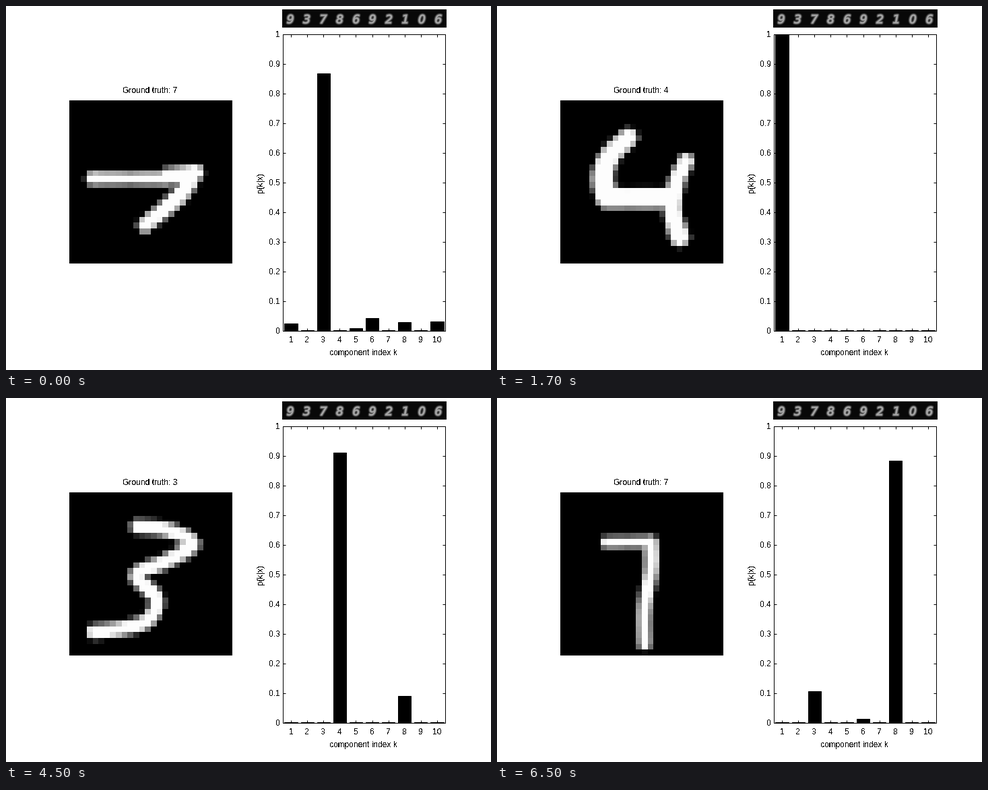
Write a matplotlib script that moves like this. It is 720 by 540 pixels and loops after 8 s.

```python
import numpy as np
import matplotlib.pyplot as plt
from matplotlib.animation import FuncAnimation
from matplotlib.patches import Rectangle
from matplotlib.patheffects import Normal, Stroke

W, H = 720, 540
LEFT, RIGHT, TOP, BOTTOM = 411, 652, 42, 482
STEP = (RIGHT - LEFT) / 10
GRID = 28

plt.rcParams["font.family"] = "Liberation Sans"


def spline(*keys, samples=16):
    """Catmull-Rom curve through the key points."""
    p = np.array([keys[0], *keys, keys[-1]], float)
    t = np.linspace(0, 1, samples)[:, None]
    parts = [
        b + t * (c - a) / 2 + t**2 * (a - 2.5 * b + 2 * c - d / 2)
        + t**3 * (1.5 * (b - c) + (d - a) / 2)
        for a, b, c, d in zip(p, p[1:], p[2:], p[3:])
    ]
    return np.concatenate(parts)


def ellipse(cx, cy, rx, ry):
    angle = np.linspace(0, 2 * np.pi, 120)
    return np.column_stack([cx + rx * np.cos(angle), cy + ry * np.sin(angle)])


def pen(path, start, end=None):
    """Grey image of a soft pen whose radius runs from start to end."""
    radius = np.linspace(start, start if end is None else end, len(path))
    cells = np.arange(GRID) + 0.5
    dx = cells[None, :, None] - path[:, 0]
    dy = cells[:, None, None] - path[:, 1]
    depth = (radius - np.hypot(dx, dy)).max(axis=2)
    return np.clip(depth + 0.5, 0, 1) * 0.99


def digit(*strokes):
    return np.max(strokes, axis=0)


wide_seven = digit(
    pen(spline((4, 13.4), (17, 13.4)), 1.15),
    pen(spline((17, 13), (21.7, 12.4)), 1.4),
    pen(spline((21, 13), (18.8, 16.5), (13, 21.4)), 1.6, 1.3),
)
four = digit(
    pen(spline((11.7, 6.4), (8.6, 9.5), (7.3, 13), (8, 16.4)), 1.6, 2),
    pen(spline((8, 16.75), (18.5, 16.75)), 1.8),
    pen(spline((21.6, 10.4), (20, 14), (19.3, 19), (20.5, 23.4)), 1.3, 1.7),
)
zero = digit(
    pen(ellipse(14.9, 14.8, 8.9, 6.7), 1.05),
    pen(spline((13.4, 6.4), (12.7, 8)), 1.2, 1.8),
    pen(spline((13, 8.8), (12.5, 10.9)), 0.65),
)
three = digit(
    pen(spline((11.8, 5.9), (17, 6.5), (21.2, 8.9), (16.5, 11.9),
               (11.6, 14.2), (15, 18.3), (13.4, 22), (9, 23.4),
               (4.2, 23.95)), 1.25),
)
slim_seven = digit(
    pen(spline((8, 8.6), (15, 8.5)), 0.95),
    pen(spline((15.5, 8.7), (15.6, 13), (14.5, 20), (14.5, 26)), 1.25, 1.05),
)

# (number of half seconds, label, image, probabilities that are not near zero)
scenes = [
    (1, 7, wide_seven, {1: 0.025, 3: 0.869, 5: 0.01, 6: 0.043, 8: 0.03,
                        10: 0.032}),
    (4, 4, four, {1: 1}),
    (4, 10, zero, {9: 1}),
    (4, 3, three, {4: 0.911, 8: 0.091}),
    (3, 7, slim_seven, {3: 0.107, 6: 0.014, 8: 0.884}),
]
timeline = [scene for scene in scenes for _ in range(scene[0])]

fig = plt.figure(figsize=(W / 72, H / 72), dpi=72, facecolor="white")
ax = fig.add_axes([0, 0, 1, 1])


def label(x, y, text, ha="center", va="baseline", **kw):
    return ax.text(x, y, text, ha=ha, va=va, size=12, antialiased=False, **kw)


def line(x0, y0, x1, y1):
    ax.plot([x0, x1], [y0, y1], color="black", lw=1, zorder=4,
            solid_capstyle="butt")


def blurred(x, y, text):
    """Slanted digit with a soft glow made of ever narrower outlines."""
    glow = [Stroke(linewidth=5.5 - 5 * s, foreground=str(0.06 + 0.5 * s**1.3))
            for s in np.linspace(0, 1, 9)]
    ax.text(x, y, text, size=17, family="DejaVu Sans", style="italic",
            color="0.66", ha="center", va="baseline",
            path_effects=[*glow, Normal()])


picture = ax.imshow(wide_seven, cmap="gray", vmin=0, vmax=1, aspect="auto",
                    extent=(94, 336, 382, 140), interpolation="nearest")
ax.set(xlim=(0, W), ylim=(H, 0), autoscale_on=False)
ax.axis("off")

ax.add_patch(Rectangle((410, 5), 244, 27, fc="0.03", lw=0))
for k, text in enumerate("9378692106"):
    blurred(410 + 24.4 * (k + 0.5), 25.5, text)

ax.add_patch(Rectangle((LEFT, TOP), RIGHT - LEFT, BOTTOM - TOP, fill=False,
                       ec="black", lw=1, zorder=4))
columns = []
for k in range(1, 11):
    x = LEFT + (k - 0.5) * STEP
    line(x, TOP, x, TOP + 4)
    line(x, BOTTOM, x, BOTTOM - 4)
    label(x, 499, str(k))
    columns.append(ax.add_patch(Rectangle(
        (x - 0.4 * STEP, BOTTOM), 0.8 * STEP, 0, fc="black", ec="black",
        lw=1, zorder=3)))

for i in range(11):
    y = BOTTOM - i * (BOTTOM - TOP) / 10
    line(LEFT, y, LEFT + 4, y)
    line(RIGHT, y, RIGHT - 4, y)
    label(407, y + 4.5, f"{i / 10:g}", ha="right")

title = label(214, 129, "")
label(530, 518, "component index k")
label(378, 262, "p(k|x)", va="center", rotation=90)


def update(frame):
    _, truth, image, values = timeline[frame]
    title.set_text(f"Ground truth: {truth}")
    picture.set_data(image)
    for k, column in enumerate(columns, 1):
        height = max(values.get(k, 0) * (BOTTOM - TOP), 1)
        column.set_y(BOTTOM - height)
        column.set_height(height)
    return [title, picture, *columns]


anim = FuncAnimation(fig, update, frames=len(timeline), interval=500,
                     repeat=True, repeat_delay=0)
plt.show()
```
